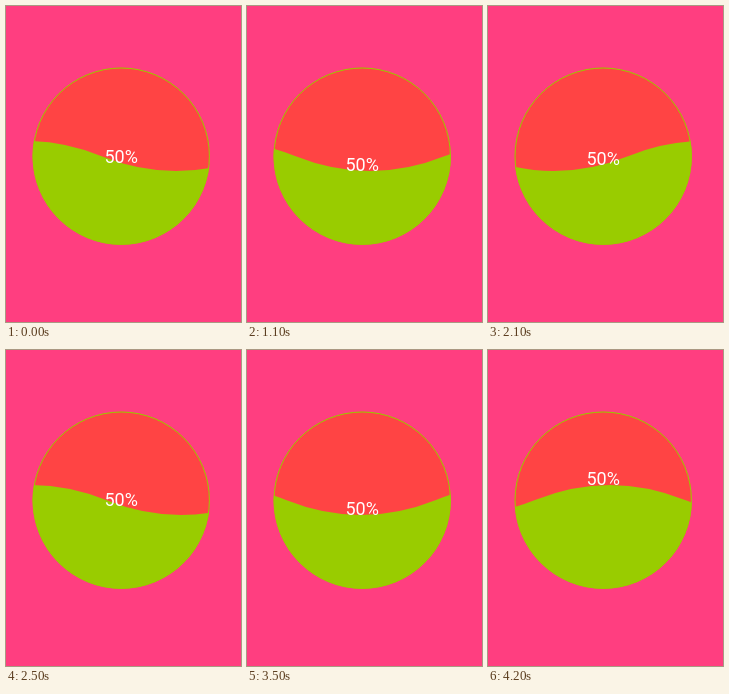
Recreate the animation shown at these times as an HTML page. Size 235 by 316 pixels, loop 4.3 s.

```html
<!DOCTYPE html>
<html lang="en">
<head>
<meta charset="utf-8">
<title>Wave progress</title>
<style>
  html, body { margin: 0; width: 100%; height: 100%; overflow: hidden; background: #ff3e80; }
  svg { display: block; width: 100%; height: 100%; }
  text { font: 18px Roboto, sans-serif; fill: #fff; text-anchor: middle; }
</style>
</head>
<body>
<svg viewBox="0 0 235 316">
  <defs>
    <clipPath id="disc"><circle cx="115.2" cy="150.2" r="88.6"/></clipPath>
  </defs>
  <rect width="235" height="316" fill="#ff3e80"/>
  <circle cx="115.2" cy="150.2" r="88.6" fill="#ff4444"/>
  <path id="wave" fill="#99cc00" clip-path="url(#disc)"/>
  <circle cx="115.2" cy="150.2" r="88.2" fill="none" stroke="#99cc00"/>
  <text id="label" x="115.2">50%</text>
</svg>
<script>
const LOOP = 4300, STEP = 100;
const HALF = 150, LEVEL = 150, AMP = 15, CENTER = 115;
const wave = document.getElementById('wave');
const label = document.getElementById('label');

// Distance travelled by a trough: [ms, px]
const travel = [
  [0, 170], [600, 317], [1600, 529], [2500, 775],
  [3100, 917], [3500, 1014], [4200, 1172], [4300, 1196]
];

function troughAt(t) {
  const i = travel.findIndex(k => k[0] > t);
  const [t0, x0] = travel[i - 1], [t1, x1] = travel[i];
  return x0 + (x1 - x0) * (t - t0) / (t1 - t0);
}

// Height of the parabolic wave at x
function surface(x, trough) {
  const period = 2 * HALF;
  const p = (((x - trough + HALF / 2) % period) + period) % period;
  const u = (p % HALF) / (HALF / 2) - 1;
  return LEVEL + (p < HALF ? 1 : -1) * AMP * (1 - u * u);
}

function draw(t) {
  const trough = troughAt(t);
  const start = (trough - HALF / 2) % (2 * HALF) - 2 * HALF;
  let d = `M${start} ${LEVEL}`;
  for (let i = 0; i < 6; i++) {
    d += `q${HALF / 2} ${i % 2 ? -2 * AMP : 2 * AMP} ${HALF} 0`;
  }
  wave.setAttribute('d', d + `V316H${start}Z`);
  label.setAttribute('y', surface(CENTER, trough) + 0.3);
}

function tick() {
  const t = performance.now() % LOOP;
  draw(Math.floor(t / STEP) * STEP);
  requestAnimationFrame(tick);
}
tick();
</script>
</body>
</html>
```
